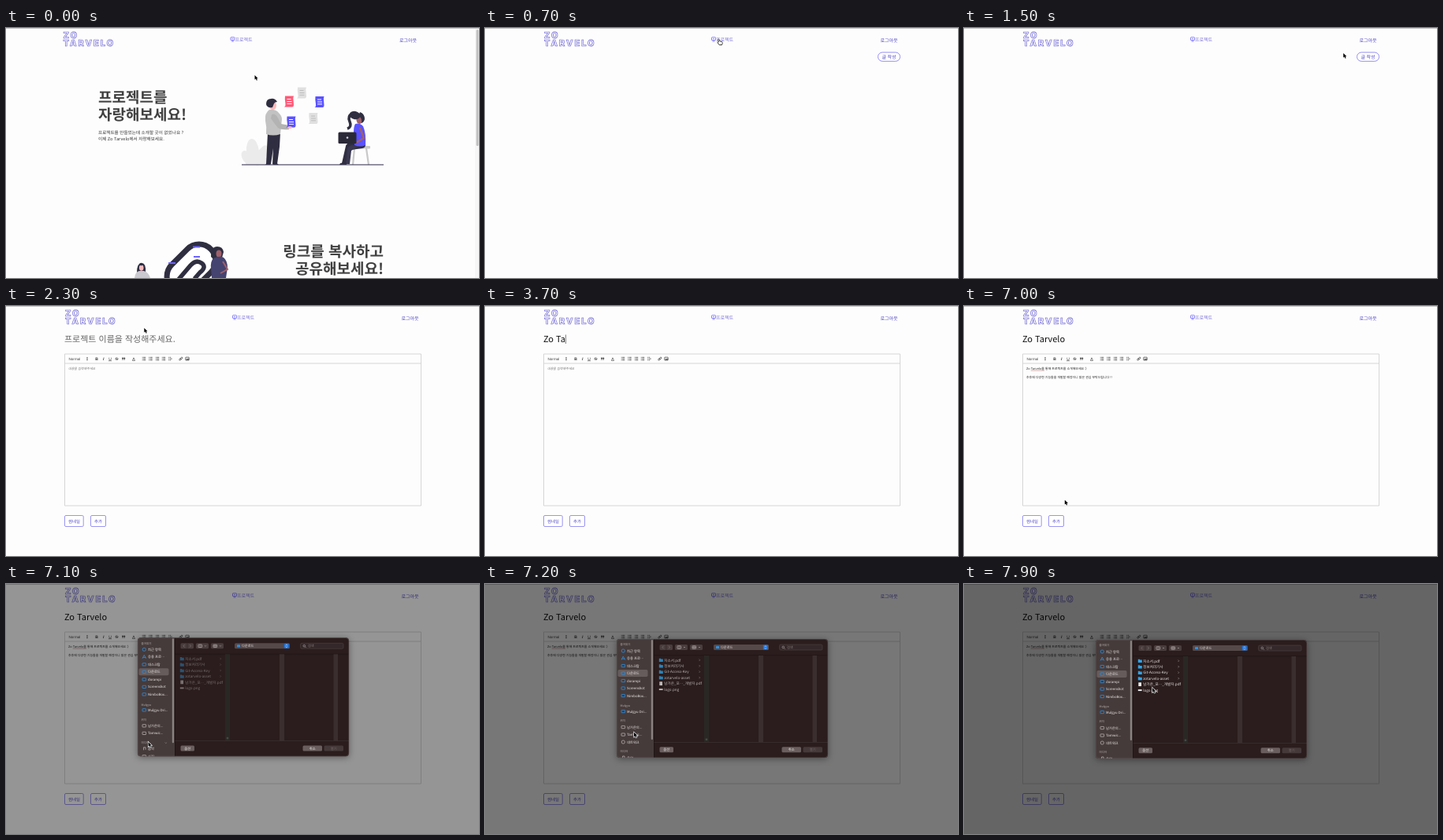
An HTML page with a canvas for the animation above (8000 ms loop, 600 by 318 pixels).

```html
<!DOCTYPE html>
<html lang="ko">
<head>
<meta charset="utf-8">
<title>Zo Tarvelo</title>
<style>
html, body { margin: 0; width: 100%; height: 100%; overflow: hidden; background: #fdfdfd; }
canvas { display: block; width: 600px; height: 318px; }
</style>
</head>
<body>
<canvas id="stage"></canvas>
<script>
const LOOP = 8000, STEP = 100, W = 600, H = 318;
const KR = '"Noto Sans CJK KR", "Noto Sans CJK", "Noto Sans", sans-serif';
const INK = '#2f2e41', VIOLET = '#6c63ff', LINK = '#5148c4', SKIN = '#a0616a', PALE = '#ffb9b9';
const NAME = 'Zo Tarvelo';
const LINES = [NAME + '를 통해 프로젝트를 소개해보세요 :)',
  '추후에 다양한 기능들을 개발할 예정이니 많은 관심 부탁드립니다 !!'];

const canvas = document.getElementById('stage');
const scale = Math.max(1, window.devicePixelRatio || 1);
canvas.width = W * scale;
canvas.height = H * scale;
const g = canvas.getContext('2d');
g.textRendering = 'geometricPrecision';

// y is the optical middle of the line
function text(s, x, y, size, color, { align = 'left', weight = 400, style = '', family = KR } = {}) {
  g.font = `${style} ${weight} ${size}px ${family}`;
  g.textAlign = align;
  g.fillStyle = color;
  g.fillText(s, x, y + size * 0.37);
}
function textWidth(s, size) {
  g.font = `400 ${size}px ${KR}`;
  return g.measureText(s).width;
}
function rect(x, y, w, h, color) {
  g.fillStyle = color;
  g.fillRect(x, y, w, h);
}
function box(x, y, w, h, r, fill, stroke, width = 1) {
  g.beginPath();
  g.roundRect(x, y, w, h, r);
  if (fill) { g.fillStyle = fill; g.fill(); }
  if (stroke) { g.strokeStyle = stroke; g.lineWidth = width; g.stroke(); }
}
function shape(d, fill) {
  g.fillStyle = fill;
  g.fill(new Path2D(d));
}
function line(d, color, width = 1) {
  g.strokeStyle = color;
  g.lineWidth = width;
  g.stroke(new Path2D(d));
}
function oval(x, y, rx, ry, color, turn = 0) {
  g.beginPath();
  g.ellipse(x, y, rx, ry, turn, 0, Math.PI * 2);
  g.fillStyle = color;
  g.fill();
}
function shifted(x, y, draw) {
  g.save();
  g.translate(x, y);
  draw();
  g.restore();
}

function header(dx) {
  rect(0, 0, W, 1, '#c4c4c4');
  shifted(dx, 0, () => {
    g.font = '800 11px Inter, sans-serif';
    g.textAlign = 'left';
    g.letterSpacing = '2px';
    g.strokeStyle = '#5b52cf';
    g.lineWidth = 0.6;
    NAME.toUpperCase().split(' ').forEach((word, i) => g.strokeText(word, 75, 12.6 + i * 10.6));
    g.letterSpacing = '0px';
    box(287.5, 11.8, 5, 3.8, 0.6, null, VIOLET, 0.8);
    line('M289 13.7h2M290 15.6v1M288.5 17h3', VIOLET, 0.7);
    text('프로젝트', 293, 14.8, 6, '#7d75dc');
    text('로그아웃', 501.5, 15.8, 6, LINK);
  });
}

function note(x, y, color) {
  shape(`M${x + 1} ${y}h11q-1 2-.5 5l.5 6q0 3-2 3h-10q2-1 1.5-4l-.7-6z`, color);
  const ink = color === '#e0e0e0' ? '#bdbdbd' : '#fff';
  line(`M${x + 3.5} ${y + 4}h5M${x + 3.5} ${y + 7}h6M${x + 3.5} ${y + 9.8}h6`, ink, 1);
}

function sharingScene() {
  const leaf = '#ebebeb';
  oval(306, 165, 6, 10, leaf, -0.6);
  oval(313, 157, 8, 16, leaf, -0.1);
  oval(324, 162, 6, 14, leaf, 0.5);
  rect(304, 165, 26, 9, leaf);

  note(369, 75.5, '#e0e0e0');
  note(383.5, 108, '#e0e0e0');
  note(353, 86.5, '#ff5a77');
  note(391.5, 87, '#5a52ff');

  // standing figure
  shape('M332 133h16l-1 18-3 22h-6l1-20-3 20h-6z', INK);
  shape('M329 174q1-3 5-2.5l2 2.5zM338 174q2-3 5-2.5l3 2.5z', INK);
  oval(338.5, 98.5, 4.5, 5.5, PALE);
  shape('M330 97q0-7 6-7 5-1 8 4-3 0-4 2l-2 5q-7 1-8-4z', INK);
  shape('M334 104q8-1 12 4 4 4 4 8l-2 19q-9 3-18 0 1-9-1-17-1-10 5-14z', '#c2c2c2');
  shape('M337 110q4-2 7 3l5 9 11 2-1 5q-10 1-14-2-5-6-9-12z', '#b3b3b3');
  note(355.5, 112.5, '#5a52ff');
  oval(360, 126.5, 3, 1.6, PALE);

  // seated figure
  box(437, 150, 25, 3.5, 1, '#c9c9c9');
  line('M442 153L440 174M457 153L460 174', '#c9c9c9', 2.2);
  shape('M456 146q1 6-4 7l-14 2-7 18-5-1 5-22q1-4 7-4z', INK);
  shape('M448 150l-10 6-2 17h-5l2-19q1-4 6-5z', '#393850');
  shape('M424 172l8-1v3h-9z', INK);
  shape('M443 122q6-2 10 3 4 9 3 24-7 3-14 0 1-8-1-15 0-9 2-12z', '#5a52ff');
  oval(448.5, 116, 4.2, 6, SKIN);
  oval(442.5, 111, 7, 5.2, INK, 0.2);
  shape('M449 107q6 2 6 9-1 4-4 5 1-7-4-9z', INK);
  line('M439 109Q433 112 436 119T433 128', INK, 3.5);
  line('M449 127L454 140L444 146', SKIN, 2.5);
  box(421.5, 132.5, 23, 14.5, 1.5, '#2a2938');
  oval(433, 139.5, 1.3, 1.3, '#d0d0d8');

  rect(299, 173.4, 180, 1.1, '#3f3d56');
}

function linkScene() {
  shifted(235, 306, () => {
    g.rotate(-Math.PI / 4);
    box(-35, -21, 70, 42, 21, '#fff', INK, 7);
  });
  line('M217 322L234 302Q241 294 248 299T246 311L239 319', INK, 5.5);
  line('M237 278.5h9M238 291h8M206 299h9', VIOLET, 1.8);
  // left figure
  shape('M166 311q0-12 6-12 6 0 5 12z', INK);
  oval(171.7, 305, 2.8, 3.8, PALE);
  oval(171.5, 300.5, 2.2, 1.8, INK);
  shape('M163 318q1-8 6-9h6q6 2 8 9z', '#c9c9cf');
  // right figure
  shape('M260 291q0-13 8-13 7 0 8 7l-2 7-10 3z', INK);
  oval(270, 287, 3.5, 4.5, SKIN);
  shape('M263 293q8-4 13-1 5 4 5 13l-2 13h-18l-1-12q-1-9 3-13z', '#454370');
  line('M275 297L281 307L272 312', SKIN, 2);
}

function homePage() {
  header(-2.5);
  const bold = { weight: 700 }, right = { weight: 700, align: 'right' };
  text('프로젝트를', 117, 88, 19, '#404040', bold);
  text('자랑해보세요!', 117, 110, 19, '#404040', bold);
  text('프로젝트를 만들었는데 소개할 곳이 없었나요 ?', 117, 132.5, 5.6, '#333');
  text(`이제 ${NAME}에서 자랑해보세요.`, 117, 140.8, 5.6, '#333');
  sharingScene();
  text('링크를 복사하고', 479, 284, 19, '#404040', right);
  text('공유해보세요!', 479, 306, 19, '#404040', right);
  linkScene();
  rect(595, 1, 5, H, '#f6f6f6');
  box(596.5, 2, 3, 148, 1.5, '#c1c1c1');
}

function listPage() {
  header(0);
  box(498.5, 31, 28, 11.3, 5.6, '#fff', '#8a83f0', 0.9);
  text('글 작성', 512.5, 36.8, 6, LINK, { align: 'center' });
}

function toolbar() {
  const sans = { family: '"Liberation Sans", Arial, sans-serif' };
  const glyph = (s, x, opt) => text(s, x, 67.1, 5, '#333', { ...sans, align: 'center', ...opt });
  text('Normal', 79.5, 67.2, 4.6, '#444', sans);
  shape('M102 66.5l1-1.7 1 1.7zM102 67.7l1 1.7 1-1.7z', '#333');
  glyph('B', 115, { weight: 700 });
  glyph('I', 123.6, { style: 'italic', weight: 700 });
  glyph('U', 132);
  glyph('S', 140.5);
  line('M130 69.7h4M138.2 67.1h4.6M160.2 69.5h3.6', '#333', 0.6);
  oval(148, 66.6, 0.9, 1, '#333');
  oval(150.2, 66.6, 0.9, 1, '#333');
  line('M148.7 66.5l-1 2.5M150.9 66.5l-1 2.5', '#333', 0.6);
  glyph('A', 162);
  for (const x of [175, 183.5, 192, 200, 208.5]) {
    const last = x === 208.5 ? -1.5 : 0;
    line(`M${x - 0.8} 65.3h${3 + last}M${x - 0.8} 67.1h3M${x - 0.8} 68.9h${3 + last}`, '#333', 0.7);
    line(`M${x - 2.2} 65.3h.8M${x - 2.2} 67.1h.8M${x - 2.2} 68.9h.8`, '#333', 0.8);
  }
  shifted(221.8, 67.1, () => {
    g.rotate(-0.7);
    box(-2.5, -0.9, 2.6, 1.8, 0.9, null, '#333', 0.7);
    box(-0.1, -0.9, 2.6, 1.8, 0.9, null, '#333', 0.7);
  });
  box(227.8, 65.2, 4.4, 3.8, 0.4, null, '#333', 0.7);
  shape('M228.2 68.6l1.3-1.7 1 .7 1-1 .5 2z', '#333');
}

function titleCount(t) {
  if (t < 3200) return 0;
  if (t <= 4000) return Math.ceil((t - 3100) / 900 * 7);
  return t < 4200 ? 8 : t < 4400 ? 9 : NAME.length;
}

function bodyText(t) {
  const total = LINES[0].length + LINES[1].length;
  const n = Math.max(0, Math.min(total, Math.round(total * (t - 5300) / 900)));
  return [LINES[0].slice(0, n), LINES[1].slice(0, Math.max(0, n - LINES[0].length))];
}

function editorPage(t) {
  header(0);
  const title = NAME.slice(0, titleCount(t));
  if (title) text(title, 74, 42, 11, '#111');
  else text('프로젝트 이름을 작성해주세요.', 74, 42, 11, '#666');
  if (t >= 2700 && t < 4700) rect(74.3 + textWidth(title, 11), 36.5, 0.6, 11.5, '#333');

  box(74.5, 61, 452, 193, 0, null, '#d2d2d2', 0.9);
  line('M74.5 73h452', '#d2d2d2', 0.9);
  toolbar();

  const size = 3.93, [first, second] = bodyText(t);
  if (first) {
    text(first, 79, 79.6, size, '#222');
    text(second, 79, 90.2, size, '#222');
    const typed = first.slice(3, NAME.length + 1);
    const x = 79 + textWidth('Zo ', size);
    rect(x, 81.8, textWidth(typed, size), 0.5, '#a66');
  } else {
    text('내용을 입력해주세요', 79, 79.6, 4, '#777', { style: 'italic' });
  }
  if (t >= 5200 && t < 6500) {
    const last = second || first;
    rect(79 + textWidth(last, size), second ? 88 : 77.2, 0.6, 4.6, '#222');
  }

  const label = { align: 'center' };
  box(74.5, 266.5, 23.7, 14, 1.5, '#fff', '#8f88f2', 0.9);
  box(107.5, 266.5, 19, 14, 1.5, '#fff', '#8f88f2', 0.9);
  text('썸네일', 86.4, 273.6, 5.4, LINK, label);
  text('추가', 117, 273.6, 5.4, LINK, label);
}

const PLACES = [
  [78, '즐겨찾기', 1], [86, '최근 항목'], [95.5, '응용 프로⋯'], [105, '데스크탑'], [114.5, '다운로드'],
  [124, 'dorampi'], [133.5, 'Screenshot'], [143, 'NimboBox...'], [156, 'Mulgyu', 1], [163, 'Mulgyu Dri...'],
  [175, '위치', 1], [183, '남가온의...'], [192.5, 'Tarnwic...'], [202, '네트워크'],
  [214, '미디어', 1], [222, '음악'], [231.5, '사진']
];
const FILES = ['자소서.pdf', '정보처리기사', 'Git-Access-Key', 'zotarvelo-asset', '남가온_포⋯_개발자.pdf', 'logo.png'];

function sidebar(opening) {
  rect(167, 71, 47, 151, '#463b3b');
  box(168.5, 110, 38, 9, 1.8, '#675c5c');
  for (const [y0, name, head] of PLACES) {
    if (opening && name === '네트워크') continue;
    const y = opening && y0 > 202 ? y0 - 9.5 : y0;
    if (head) {
      text(name, 171.5, y, 3.5, '#948a8a', { weight: 700 });
      continue;
    }
    const gray = y0 > 175;
    const ink = gray ? '#b5adad' : '#2b8fe0';
    if (name === '응용 프로⋯') line(`M173 ${y + 2}l2.3-4.5 2.3 4.5M173.5 ${y + 0.6}h3.8`, ink, 0.8);
    else if (name === '음악') line(`M174.5 ${y + 1.5}v-3.5h2.5v3`, ink, 0.8);
    else if (name === '최근 항목' || name === '네트워크') box(173.2, y - 2.1, 4.2, 4.2, 2.1, null, ink, 0.8);
    else box(173, y - 1.6, 4.6, 3.3, 0.4, null, ink, 0.8);
    text(name, 180, y, 4.3, '#f0ecec', { weight: 500 });
  }
  if (opening) line('M201.5 204.2l1.3 1.2 1.3-1.2', '#948a8a', 0.6);
  box(210.8, 72, 2.2, opening ? 133 : 127, 1.1, '#8b8181');
}

function dialogTools() {
  const fill = '#4a3d3d', ink = '#b9b0b0';
  box(221.5, 78, 16.5, 7, 1.5, fill);
  line('M226.5 79.8l-1.5 1.7 1.5 1.7M233 79.8l1.5 1.7-1.5 1.7', '#7b7070', 0.8);
  line('M229.8 78v7', '#2b1e1e', 0.5);
  for (const x of [241, 260]) {
    box(x, 78, 16, 7, 1.5, fill);
    box(x + 3, 79.8, 4.5, 3.5, 0.4, null, ink, 0.7);
    line(`M${x + 5.2} 79.8v3.5M${x + 11} 81l1 1 1-1`, ink, 0.6);
  }
  line('M263 81.5h4.5', ink, 0.6);
  box(290, 78, 70, 7, 1.6, '#56494a');
  box(293, 80, 4, 3, 0.6, '#2b8fe0');
  text('다운로드', 299, 81.5, 4.2, '#e8e3e3');
  box(352.8, 78.5, 6, 6, 1.3, '#1d74e0');
  line('M354.6 80.9l1.2-1.2 1.2 1.2M354.6 82.2l1.2 1.2 1.2-1.2', '#fff', 0.6);
  box(373.5, 78, 54.5, 7, 1.6, '#35282a', '#544848', 0.5);
  line('M379.4 82.5l1.3 1.3M379.6 81.4a1.3 1.3 0 1 1-2.6 0a1.3 1.3 0 1 1 2.6 0', ink, 0.6);
  text('검색', 383, 81.5, 4.2, '#8b8181');
}

function fileList(bright) {
  g.save();
  g.globalAlpha = bright;
  FILES.forEach((name, i) => {
    const y = 97.8 + i * 7.45;
    if (i < 4) {
      shape(`M220.8 ${y - 2}h2l.7.7h2.3v3.5h-5z`, '#2fa4ea');
      line(`M271.5 ${y - 1.2}l1.2 1.2-1.2 1.2`, '#a59c9c', 0.6);
    } else if (i === 4) box(221.3, y - 2.4, 3.7, 4.8, 0.3, '#eee');
    else rect(220.8, y - 0.9, 4.8, 1.9, '#eee');
    text(name, 227.2, y, 4.6, '#ece7e7');
  });
  g.restore();
}

function fileDialog(t) {
  const opening = t < 7200, settling = t < 7300;
  shifted(0, opening ? -2.7 : settling ? -1 : 0, () => {
    g.save();
    g.shadowColor = 'rgba(0,0,0,.4)';
    g.shadowBlur = 8 * scale;
    g.shadowOffsetY = 1.5 * scale;
    box(167, 71, 268, 151, 4, '#2b1d1d');
    g.restore();
    g.save();
    g.beginPath();
    g.roundRect(167, 71, 268, 151, 4);
    g.clip();
    sidebar(opening);
    rect(214, 71, 0.6, 151, '#1c1212');
    dialogTools();
    rect(214.5, 91.5, 220.5, 0.6, '#1c1212');
    rect(278, 92, 6, 110, '#2a2825');
    rect(347, 92, 6, 110, '#3b2e2e');
    rect(415.5, 92, 5.5, 110, '#3b2e2e');
    line('M280.2 197.5v2.5M281.6 197.5v2.5', '#6d7a74', 0.5);
    rect(214.5, 202, 220.5, 0.6, '#403434');
    fileList(opening ? 0.4 : settling ? 0.75 : 1);
    const mid = { align: 'center' };
    box(221.5, 208.3, 17.5, 7, 1.5, '#6a5e5e');
    text('옵션', 230.2, 211.8, 4.3, '#eee', mid);
    box(376.5, 208.3, 24.5, 7, 1.5, '#6a5e5e');
    text('취소', 388.8, 211.8, 4.3, '#eee', mid);
    box(403.5, 208.3, 24.5, 7, 1.5, '#45393a');
    text('열기', 415.8, 211.8, 4.3, '#776c6c', mid);
    g.restore();
    box(167.2, 71.2, 267.6, 150.6, 4, null, '#655b5b', 0.5);
  });
}

// time, x, y of the pointer tip
const PATH = [
  [0, 315.5, 60], [100, 314, 56], [300, 307, 36], [500, 296.5, 14], [900, 296.5, 14],
  [1600, 512, 35], [1800, 512, 35], [2300, 175.3, 28], [2500, 112, 41], [4300, 112, 41],
  [5100, 141.8, 91.5], [6500, 141.8, 91.5], [6800, 90, 271], [7000, 127.8, 246.8],
  [7100, 180.5, 201], [7400, 206, 164], [7900, 239, 132], [8000, 239, 132]
];
function pointerAt(t) {
  const i = PATH.findIndex((p, k) => t >= p[0] && t < PATH[k + 1][0]);
  const [t0, x0, y0] = PATH[i], [t1, x1, y1] = PATH[i + 1];
  const k = (t - t0) / (t1 - t0);
  return [x0 + (x1 - x0) * k, y0 + (y1 - y0) * k];
}

function within(t, spans) {
  return spans.some(([a, b]) => t >= a && t < b);
}

function pointer(t) {
  if (within(t, [[3200, 4400], [5400, 6500]])) return;
  const [x, y] = pointerAt(t);
  shifted(x, y, () => {
    if (within(t, [[500, 1000], [1600, 1800], [6800, 6900]])) {
      const hand = 'M-.8 .6q.8-1 1.5 0l.7 2.2 2.5.6q1 .6.8 2l-.7 2.1h-3.3l-2.2-2.9q0-1 1.3-.6z';
      shape(hand, '#fff');
      line(hand, '#111', 0.8);
    } else if (within(t, [[2400, 5300], [6500, 6700]])) {
      line('M-1.4-3q1.4 0 1.4.8v4.4q0 .8-1.4.8M1.4-3q-1.4 0-1.4.8v4.4q0 .8 1.4.8', '#333', 0.8);
    } else {
      const arrow = 'M0 0v5.8l1.3-1.2 1 2.2 1.1-.5-1-2.1h1.8z';
      line(arrow, '#fff', 1.2);
      shape(arrow, '#000');
    }
  });
}

function draw(t) {
  g.setTransform(scale, 0, 0, scale, 0, 0);
  rect(0, 0, W, H, '#fdfdfd');
  if (t < 600) homePage();
  else if (t < 1800) listPage();
  else editorPage(t);
  if (t >= 7100) {
    const shade = t < 7200 ? 0.41 : t < 7300 ? 0.53 : 0.6;
    rect(0, 0, W, H, `rgba(0,0,0,${shade})`);
    fileDialog(t);
  }
  pointer(t);
}

const start = performance.now();
function tick() {
  const t = (performance.now() - start) % LOOP;
  draw(Math.floor(t / STEP) * STEP);
  requestAnimationFrame(tick);
}
tick();
</script>
</body>
</html>
```
